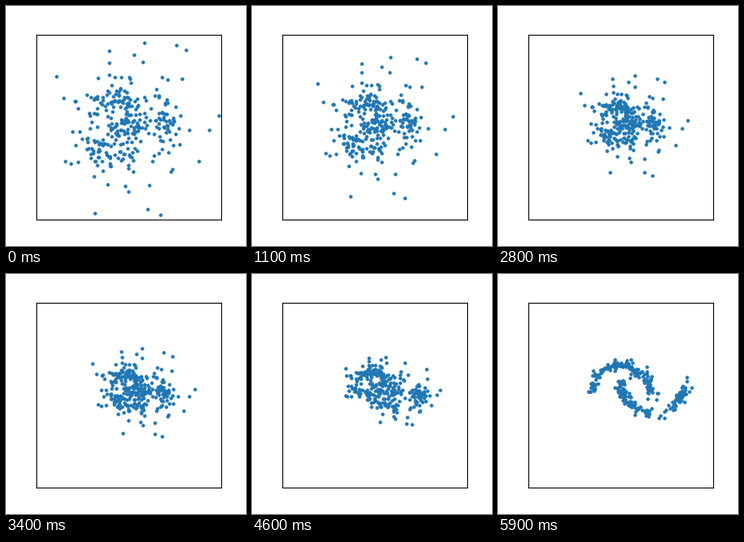
Write a matplotlib script that moves like this. It is 300 px wide and 300 px high and loops after 6400 ms.

```python
import numpy as np
import matplotlib.pyplot as plt
from matplotlib.animation import FuncAnimation

MOVING, TOTAL = 60, 64     # the last pose is held until the loop ends
SIGMA = 0.09               # thickness of the moons

# Data coordinates: the far points that outline the cloud, and its dense spots
FAR = [(-2.35, 1.65), (0.5, 2.74), (1.54, 2.66), (1.86, 2.5), (-0.64, 2.48),
       (2.92, 0.38), (2.6, -0.1), (2.26, -1.1), (1.03, -2.84), (0.61, -2.66),
       (-1.1, -2.79), (-2.06, -1.1)]
DENSE = [(-0.55, 1.05), (-0.1, 0.15), (-1.0, -0.8), (1.1, 0.3)]


def start_cloud():
    rng = np.random.default_rng(7)
    wide = rng.standard_normal((400, 2))
    wide = wide[np.hypot(*wide.T) < 2.3][:170] + (0, 0.1)
    clumps = [rng.normal(spot, 0.33, (30, 2)) for spot in DENSE]
    return np.vstack([FAR, wide, *clumps])


def two_moons(n=48):
    a = np.linspace(0, np.pi - 0.1, n)
    upper = np.column_stack([np.cos(a), np.sin(a)])
    lower = np.column_stack([1.05 - 1.08 * np.cos(a), 0.51 - 1.09 * np.sin(a)])
    return np.vstack([upper, lower])


def velocity(pos, t, moons):
    """Mean straight-line velocity from Gaussian noise to the blurred moons."""
    gap = pos[:, None] - t * moons
    var = (1 - t) ** 2 + (t * SIGMA) ** 2
    logw = -(gap ** 2).sum(axis=2) / (2 * var)
    w = np.exp(logw - logw.max(axis=1, keepdims=True))
    w /= w.sum(axis=1, keepdims=True)
    pull = (t * SIGMA ** 2 - (1 - t)) / var
    return (w[..., None] * (moons + pull * gap)).sum(axis=1)


def flow(substeps=4):
    moons = two_moons()
    pos = start_cloud()
    path = [pos]
    dt = 1 / ((MOVING - 1) * substeps)
    for step in range((MOVING - 1) * substeps):
        mid = pos + velocity(pos, step * dt, moons) * dt / 2
        pos = pos + velocity(mid, (step + 0.5) * dt, moons) * dt
        if (step + 1) % substeps == 0:
            path.append(pos)
    return path


path = flow()

fig, ax = plt.subplots(figsize=(3, 3), dpi=100)
ax.set(xlim=(-3, 3), ylim=(-3, 3), xticks=[], yticks=[], aspect="equal")
dots = ax.scatter(*path[0].T, s=5, color="tab:blue")


def draw(frame):
    dots.set_offsets(path[min(frame, MOVING - 1)])
    return (dots,)


anim = FuncAnimation(fig, draw, frames=TOTAL, interval=100, repeat=True,
                     repeat_delay=0)
plt.show()
```
